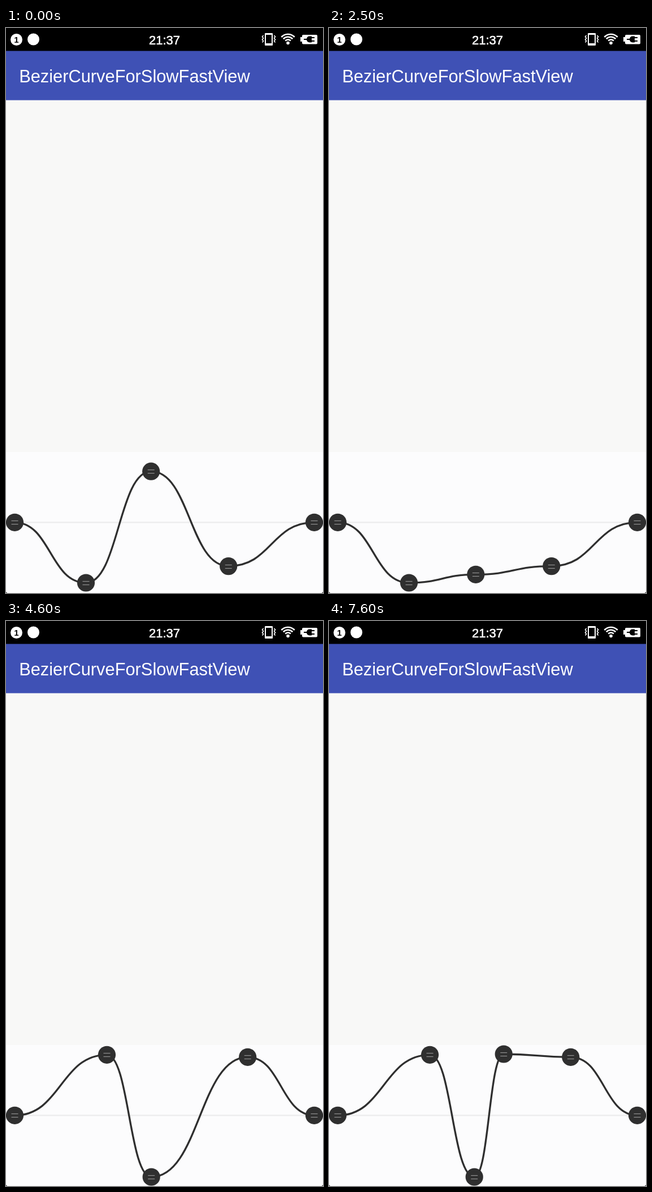
An HTML page with a canvas that plays this animation: 561x998 px, repeating every 8 s.

```html
<!DOCTYPE html>
<html lang="en">
<head>
<meta charset="utf-8">
<title>Bezier curve editor</title>
<style>
html, body { margin: 0; width: 100%; height: 100%; overflow: hidden; background: #000; }
canvas { display: block; width: 561px; height: 998px; }
</style>
</head>
<body>
<canvas id="stage" width="561" height="998"></canvas>
<script>
const ctx = document.getElementById('stage').getContext('2d');
const W = 561, H = 998, LOOP = 8000, STEP = 100;
const BASE = 873.3, INK = '#2f2f2f', WHITE = '#fff', BLACK = '#000';

// Each drag eases one handle between two points; sway bows its path sideways.
const drags = [
  { from: [141.5, 980], to: [178.5, 766.3], start: 2925, end: 3500, sway: -3.5 },
  { from: [256.7, 783.2], to: [257.2, 982], start: 1900, end: 2630, sway: 10 },
  { from: [341.5, 875], to: [309.2, 765], start: 6700, end: 7600, sway: 0, appears: 6200 },
  { from: [393.7, 950.6], to: [427.7, 770.3], start: 4120, end: 4600, sway: -6 }
];

function dragPoint({ from, to, start, end, sway }, t) {
  const p = Math.min(1, Math.max(0, (t - start) / (end - start)));
  const eased = p * p * (3 - 2 * p);
  const [x, y] = from.map((v, i) => v + (to[i] - v) * eased);
  return [x + sway * Math.sin(Math.PI * eased), y];
}

function box(x, y, w, h, color, radius = 0) {
  ctx.fillStyle = color;
  ctx.beginPath();
  ctx.roundRect(x, y, w, h, radius);
  ctx.fill();
}

function disc(x, y, r, color) {
  ctx.fillStyle = color;
  ctx.beginPath();
  ctx.arc(x, y, r, 0, Math.PI * 2);
  ctx.fill();
}

function line(points, color, width) {
  ctx.strokeStyle = color;
  ctx.lineWidth = width;
  ctx.beginPath();
  points.forEach(([x, y]) => ctx.lineTo(x, y));
  ctx.stroke();
}

function text(str, x, y, font, color, align = 'left') {
  ctx.font = font + ' "Liberation Sans", Arial, sans-serif';
  ctx.textAlign = align;
  ctx.fillStyle = color;
  ctx.fillText(str, x, y);
}

function vibrateIcon() {
  box(458, 9, 14, 22, WHITE, 1);
  box(460, 12, 10, 15, BLACK);
  for (const side of [-1, 1]) {
    const zigzag = Array.from({ length: 6 }, (_, i) =>
      [465 + side * (i % 2 ? 11.5 : 9.5), 13 + i * 2.5]);
    line(zigzag, WHITE, 1.6);
  }
}

function wifiIcon() {
  ctx.strokeStyle = WHITE;
  ctx.lineWidth = 2.7;
  for (let r = 6.5; r < 17; r += 4.75) {
    ctx.beginPath();
    ctx.arc(499, 27, r, -Math.PI * 0.76, -Math.PI * 0.24);
    ctx.stroke();
  }
  disc(499, 26.5, 2.8, WHITE);
}

function batteryIcon() {
  box(524, 12, 27, 16.5, WHITE, 2);
  box(521, 16, 4, 8, WHITE);
  box(527, 19, 7, 2, BLACK);
  box(532, 14.5, 9, 11, BLACK, [5, 0, 0, 5]);
  box(541, 16, 5, 2, BLACK);
  box(541, 22, 5, 2, BLACK);
}

function header() {
  box(0, 0, W, 41, BLACK);
  disc(18.5, 20.5, 10.5, WHITE);
  text('1', 18.3, 26, 'bold 15px', BLACK, 'center');
  disc(48.5, 20, 10.5, WHITE);
  text('21:37', 280.5, 28.5, '22px', WHITE, 'center');
  ctx.strokeStyle = WHITE;
  ctx.lineWidth = 0.6;
  ctx.strokeText('21:37', 280.5, 28.5);
  vibrateIcon();
  wifiIcon();
  batteryIcon();
  box(0, 40.5, W, 87, '#3f51b5');
  text('BezierCurveForSlowFastView', 23.2, 96, '30.8px', WHITE);
}

function curve(points) {
  ctx.strokeStyle = INK;
  ctx.lineWidth = 3.3;
  ctx.beginPath();
  ctx.moveTo(...points[0]);
  for (let i = 1; i < points.length; i++) {
    const [x0, y0] = points[i - 1], [x1, y1] = points[i];
    const mid = (x0 + x1) / 2;
    ctx.bezierCurveTo(mid, y0, mid, y1, x1, y1);
  }
  ctx.stroke();
}

function handle([x, y]) {
  disc(x, y, 15.6, INK);
  const top = Math.round(y) - 2.5;
  for (const row of [top, top + 6]) line([[x - 6, row], [x + 6, row]], '#929292', 1.2);
}

function draw(t) {
  box(0, 0, W, H, BLACK);
  box(0, 127, W, 630, '#f8f8f7');
  header();
  box(0, 749, W, H - 749, '#fcfcfd', [0, 0, 3, 3]);
  line([[15, BASE], [545, BASE]], '#eeeeee', 2.5);
  const visible = drags.filter(({ appears = 0 }) => t >= appears);
  const points = [[15.5, BASE], ...visible.map(d => dragPoint(d, t)), [545.5, BASE]];
  curve(points);
  points.forEach(handle);
}

const start = performance.now();
function tick() {
  const t = (performance.now() - start) % LOOP;
  draw(Math.floor(t / STEP) * STEP);
  requestAnimationFrame(tick);
}
tick();
</script>
</body>
</html>
```
